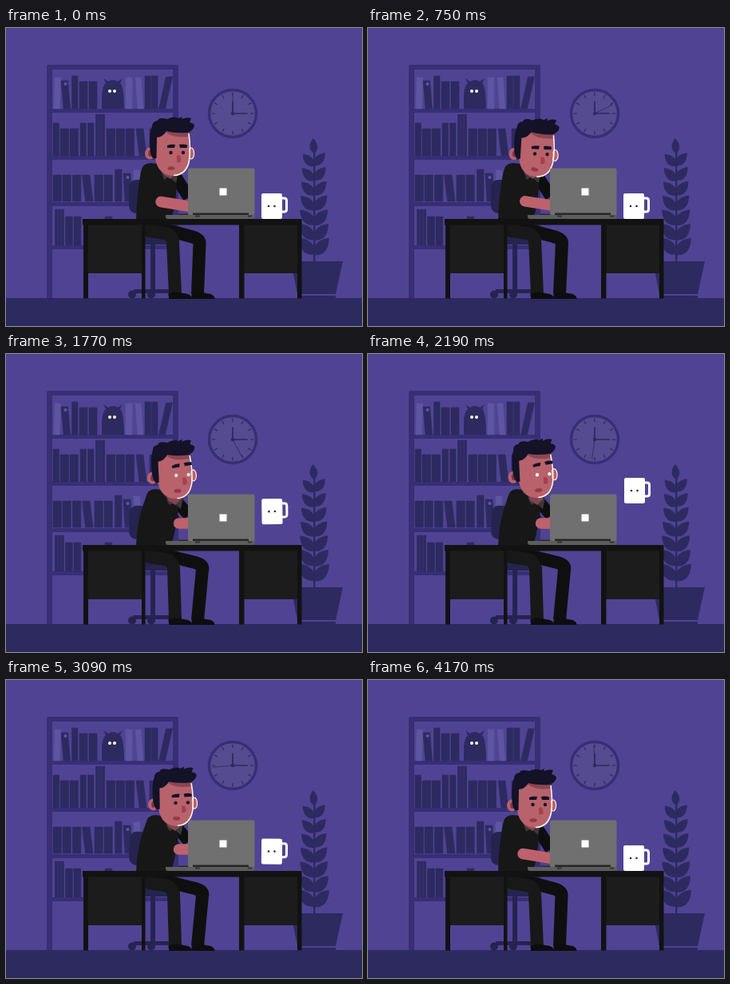
An HTML page that plays this animation: 446 px wide and 373 px high, repeating every 4.2 s.

```html
<!DOCTYPE html>
<html lang="en">
<head>
<meta charset="utf-8">
<title>Night desk</title>
<style>
html, body { margin: 0; width: 100%; height: 100%; overflow: hidden; background: #504394; }
svg { display: block; width: 446px; height: 373px; }
</style>
</head>
<body>
<svg id="stage" viewBox="0 0 446 373">
  <rect width="446" height="373" fill="#504394"/>

  <g fill="#372f74">
    <path fill-rule="evenodd" d="M53 46H214Q216 46 216 48V338H209V52H58V338H51V48Q51 46 53 46Z"/>
    <path d="M54 101H212V106H54ZM54 160H212V165H54ZM54 218H212V223H54ZM54 272H212V277H54Z"/>
  </g>
  <g id="books"></g>
  <path fill="#2d2a60" d="M120 101V84Q121 72 125 69L122 63L128 67Q134 63 140 67L146 63L143 69Q148 74 148 101Z"/>
  <g fill="#fffbe0"><circle cx="130" cy="79" r="2"/><circle cx="136" cy="79" r="2"/></g>

  <g id="clock" stroke="#2d2a60" stroke-linecap="round">
    <circle cx="284" cy="107" r="29.5" fill="#544b90" stroke="#372f74" stroke-width="3.5"/>
    <g id="ticks" stroke-width="1.2"></g>
    <path d="M284 92V107H302" fill="none" stroke-width="1.7"/>
    <path id="second" d="M284 107V82.500" stroke-width=".8"/>
    <circle cx="284" cy="107" r="2.200" fill="#2d2a60" stroke="none"/>
  </g>

  <g fill="#2d2a60">
    <path d="M385 150H387.500V294H385Z"/>
    <g id="leaves"></g>
    <path d="M357 292H422L413 333H365Z"/>
    <path d="M369 335H413V339H369Z"/>
  </g>

  <rect y="338" width="446" height="35" fill="#2d2a60"/>

  <g fill="#252450">
    <rect id="back" x="154" y="190" width="24" height="42" rx="9"/>
    <path d="M172 262H206V266Q206 271 201 271H172ZM181 270H187V328H181ZM160 327H208V332H160Z"/>
    <circle cx="158" cy="333.500" r="5"/><circle cx="182" cy="333.500" r="5"/><circle cx="208" cy="333.500" r="5"/>
  </g>

  <g fill="none" stroke-width="16" stroke-linejoin="round">
    <path id="farLeg" stroke="#0f0f0f"/>
    <path id="nearLeg" stroke="#181818"/>
  </g>
  <path id="shoe" fill="#0d0d0f" d="M204 339V333Q210 329 217 331L228 333Q233 335 233 339Z"/>
  <use href="#shoe" x="28.500"/>

  <path id="farArm" fill="none" stroke="#0e0e0e" stroke-width="15"/>
  <path id="torso" fill="#171717"/>
  <g id="neck">
    <path fill="#39393b" d="M194 178L198 190L204 186L213 194L216 180Z"/>
    <path fill="#86434f" d="M194 172H213V182L206 189L197 183Z"/>
  </g>

  <g id="head">
    <ellipse cx="232" cy="157" rx="3.600" ry="7" fill="#b8626c" stroke="#fff3e6" stroke-width="1.200"/>
    <path fill="#b8626c" d="M186 127H229V160Q229 184 211 185Q190 185 187 163Z"/>
    <path fill="#8a4654" d="M195 128H229V136Q209 138 201 131Z"/>
    <path fill="none" stroke="#fff6ea" stroke-width="1.600" d="M229 132Q231.500 150 229.500 166Q226 184 210 184.500"/>
    <ellipse cx="180.500" cy="157" rx="6.500" ry="7.500" fill="#b8626c"/>
    <ellipse cx="181" cy="157" rx="2.800" ry="4" fill="#7d3544"/>
    <path fill="#131226" d="M180.500 153Q179 132 183 123Q183 117 190 116Q191 111 202 114Q210 110 216 113L221 111L220 114Q228 111 232 113L230 118Q235 119 236 122Q235 128 228 131Q212 132 201 129Q197 136 189 137L188.500 163H184Q181 159 180.500 153Z"/>
    <g id="face">
      <path fill="#a5404f" d="M214 160Q218 158 219 162L219.500 167Q217 169 214 168Z"/>
      <g id="mouth">
        <ellipse cx="207" cy="175.500" rx="4.600" ry="2.600" fill="#9d3f4d"/>
        <path d="M203 175.500H211" stroke="#7d3040" stroke-width=".8"/>
      </g>
      <g id="eyes"><circle cx="206.500" cy="156" r="2.200"/><circle cx="222" cy="156" r="2.200"/></g>
      <g id="brows" fill="#131226">
        <path d="M202 147Q207 145 212 146L211 150H202Z"/>
        <path d="M217 146Q222 145 227 146.500V150H218Z"/>
      </g>
    </g>
  </g>

  <path id="sleeve" fill="none" stroke="#171717" stroke-width="17" stroke-linecap="round"/>
  <path id="forearm" fill="none" stroke="#bd626c" stroke-width="13.500" stroke-linecap="round"/>

  <path fill="#2a2a2a" d="M216 232.500H229V234H216Z"/>
  <rect x="228" y="175.500" width="83.500" height="59" rx="2.500" fill="#6f706f"/>
  <path fill="#262626" d="M234 231.500H304V234H234Z"/>
  <path fill="#5c5d5d" d="M200 234H312V236Q312 239 308 239H203Q200 239 200 236Z"/>
  <path fill="#343434" d="M237 234.500H243V236.500H237ZM303 234.500H308V236.500H303Z"/>
  <rect x="267.500" y="200.500" width="9" height="9" fill="#fff"/>

  <path fill="#1c1c1c" d="M102 245H171V307H102ZM297 245H366V307H297Z"/>
  <path fill="#121212" d="M96 239H370.500V338.500H365V246.500H298.500V338.500H292V246.500H174.500V338.500H170V246.500H103V338.500H97V246.500H96Z"/>

  <g id="mug">
    <path d="M345 213H348.500Q351.500 213 351.500 216V227Q351.500 230 348.500 230H345" fill="none" stroke="#fff" stroke-width="3"/>
    <rect x="320" y="207" width="26" height="32" rx="2.200" fill="#fff"/>
    <g fill="#2a2a32"><circle cx="329" cy="223" r="1.300"/><circle cx="336.500" cy="223" r="1.300"/></g>
  </g>
</svg>
<script>
const LOOP = 4200;
const DARK = "#2d2a60", LIGHT = "#5d55a0";
const $ = id => document.getElementById(id);

function add(parent, tag, attrs) {
  const el = document.createElementNS("http://www.w3.org/2000/svg", tag);
  for (const k in attrs) el.setAttribute(k, attrs[k]);
  $(parent).append(el);
  return el;
}

function book(x, w, top, bottom, lean = 0, fill = DARK) {
  add("books", "path", {
    fill, stroke: fill, "stroke-width": .6, "stroke-linejoin": "round",
    d: `M${x + lean} ${top}h${w}L${x + w} ${bottom}h${-w}Z`
  });
}
function row(bottom, top, w, ...xs) {
  xs.forEach(x => book(x, w, top, bottom));
}
function dot(x, y) {
  add("books", "circle", { cx: x, cy: y, r: 2, fill: LIGHT });
}

// Top shelf
book(60, 7.500, 62, 101, 1, LIGHT);
book(72, 8.500, 66, 101, -3);
dot(74.500, 70);
row(101, 60, 7.500, 82.500, 174, 182.500);
row(101, 67, 10, 92, 104);
book(150, 8, 62, 101, 0, LIGHT);
book(165, 7, 62, 101, -3, LIGHT);
book(191.500, 8, 61, 101, 9);
// Second shelf
row(160, 119, 7.500, 59, 93, 102.500);
row(160, 126, 10.500, 68, 80, 126, 138, 150);
row(160, 108, 3, 112.500, 116.500, 120.500);
book(167, 9, 126, 160, -4);
row(160, 126, 10, 180, 192);
// Third shelf
row(217, 184, 10.300, 59, 71, 83.500, 111, 123);
book(99.500, 9.500, 184, 217, -4);
row(217, 177, 8.500, 136.500);
book(149, 9, 182, 217, -2);
dot(152.500, 187);
book(160, 8, 178, 217, 0, LIGHT);
// Bottom shelf
row(272, 227, 3, 61.500, 65.500, 69.500);
row(272, 236, 8.800, 74.500, 85, 124);

for (let i = 0; i < 12; i++)
  add("ticks", "path", { d: "M284 81V84.500", transform: `rotate(${i * 30} 284 107)` });

function leaf(y, angle, size) {
  add("leaves", "path", {
    d: "M0 0C-9 -6 -8 -16 0 -25C8 -16 9 -6 0 0Z",
    transform: `translate(386 ${y}) rotate(${angle}) scale(${size})`
  });
}
leaf(157, -4, .76);
for (let i = 0; i < 7; i++) {
  const size = .84 + i * .05;
  leaf(173 + i * 18.400, -43, size);
  leaf(172 + i * 18.700, 41, size);
}

// time, head x, y, turn, face x, y, brow lift, body lean, eye glow
const POSE = [
  [0, 0, 0, 0, 0, 0, 0, 0, 0],
  [250, 0, 0, 0, 0, 0, 0, 0, 0],
  [750, 2.500, 1.500, 2.200, 0, 0, 0, .12, 0],
  [1200, 4, -1, -1, 2, 0, -1, .95, 0],
  [1380, 4, -2.500, -3.500, 4, -.5, -4, 1, .75],
  [2190, 1.500, -4.500, -4, 4, 0, -5, 1, 1],
  [2700, -1.300, -5.300, -4, 5, -.7, -5, 1, 1],
  [3100, 4, -2, -2, 2, 0, -1, 1, 0],
  [3510, 6.500, -.5, -1, 1, 0, 0, 1, 0],
  [4080, 0, 0, 0, 0, 0, 0, 0, 0],
  [LOOP, 0, 0, 0, 0, 0, 0, 0, 0]
];
// time, x, y, turn
const FLIGHT = [
  [0, 0, 0, 0],
  [1500, 0, 0, 0],
  [2050, .8, -53, -1.500],
  [2190, 1, -52, 0],
  [2700, .3, -51.500, 4],
  [2850, 0, -50, 3],
  [3180, 0, 0, 0],
  [LOOP, 0, 0, 0]
];

const mix = (a, b, k) => a + (b - a) * k;

function sample(table, t) {
  const i = Math.max(1, table.findIndex(step => step[0] > t));
  const a = table[i - 1], b = table[i];
  const k = (t - a[0]) / (b[0] - a[0]);
  const ease = (1 - Math.cos(Math.PI * k)) / 2;
  return a.slice(1).map((v, j) => mix(v, b[j + 1], ease));
}

const place = (id, value) => $(id).setAttribute("transform", value);
const shape = (id, d) => $(id).setAttribute("d", d);

function drawBody(k) {
  const s = 6 * k;
  shape("torso", `M163 240Q164 207 ${169 + s} 180Q${171 + s} 169 ${181 + s} 169L${200 + s / 2} 171L${214 + s / 3} 190Q214 216 207 240Z`);
  shape("farArm", `M${210 + s / 3} 182L229 ${mix(212, 202, k)}`);
  shape("sleeve", `M${182 + s} 181L${mix(192, 209, k)} ${mix(204, 207, k)}`);
  shape("forearm", `M${mix(194, 216.500, k)} ${mix(217.500, 212, k)}L234 ${mix(224, 212, k)}`);
  shape("farLeg", `M180 247L${mix(232, 237, k)} 261Q${mix(243, 248, k)} 264 ${mix(242.500, 246, k)} 270L240 333`);
  shape("nearLeg", `M172 253L200 257Q208 259 ${mix(209, 210, k)} 268L212 333`);
  place("neck", `translate(${s} 0)`);
  place("back", `rotate(${k * 1.500} 170 232)`);
}

function draw(t) {
  const [hx, hy, turn, fx, fy, brow, lean, glow] = sample(POSE, t);
  const [mx, my, tilt] = sample(FLIGHT, t);
  place("head", `translate(${hx} ${hy}) rotate(${turn} 206 157)`);
  place("face", `translate(${fx} ${fy})`);
  place("brows", `translate(-1 ${brow}) rotate(${brow * 1.300} 214 148) translate(1 0)`);
  place("mouth", `rotate(${Math.max(0, turn) * 6} 207 175)`);
  const shade = [24, 20, 36].map(c => Math.round(mix(c, 255, glow)));
  $("eyes").setAttribute("fill", `rgb(${shade})`);
  drawBody(lean);
  place("mug", `translate(${mx} ${my}) rotate(${tilt} 333 223)`);
  place("second", `rotate(${t / LOOP * 360} 284 107)`);
}

function tick() {
  draw(performance.now() % LOOP);
  requestAnimationFrame(tick);
}
tick();
</script>
</body>
</html>
```
